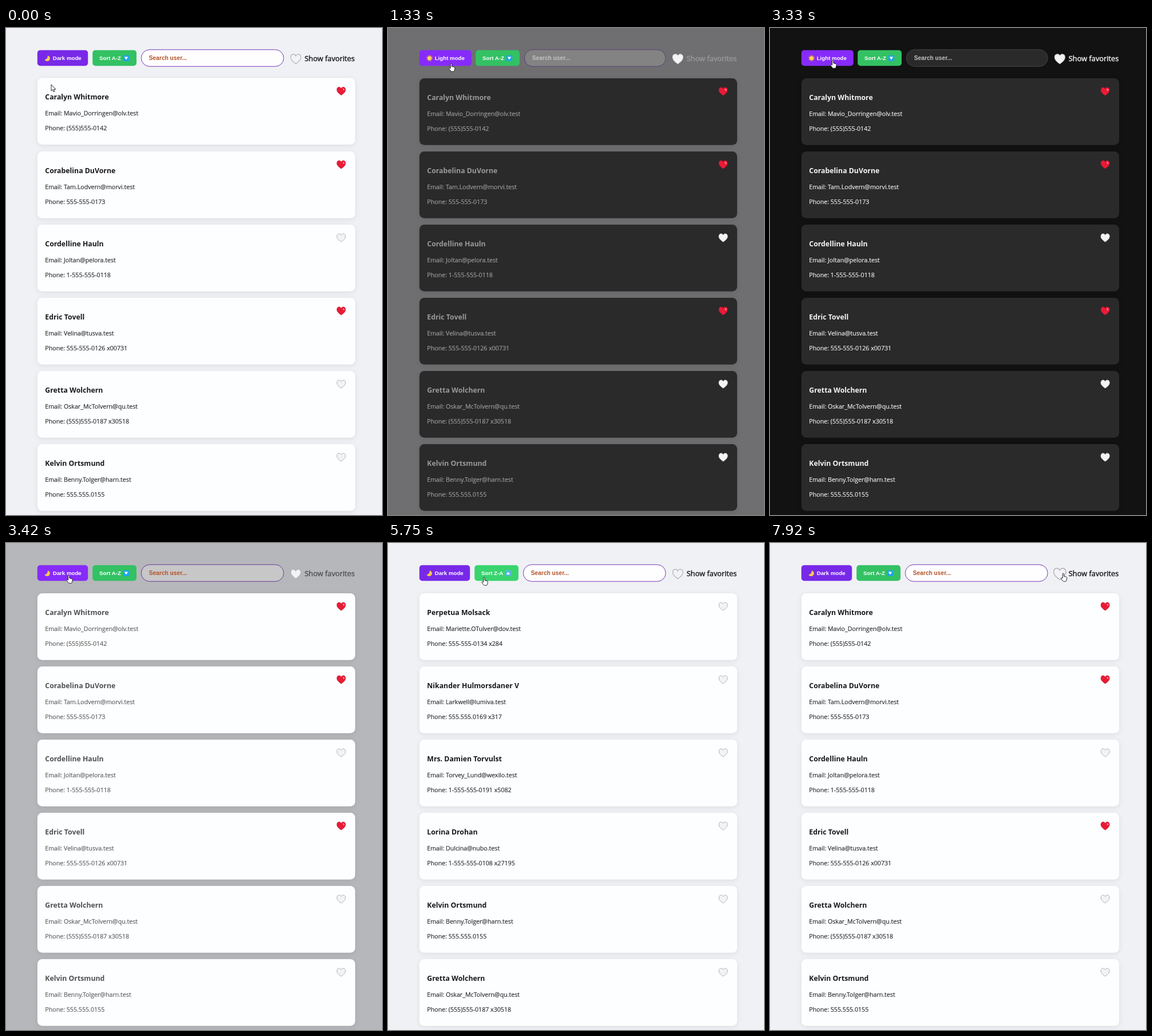
An HTML page for the animation above (8 s loop, 657x852 px).

```html
<!DOCTYPE html>
<html lang="en">
<head>
<meta charset="utf-8">
<title>User list</title>
<style>
  html, body { margin: 0; width: 100%; height: 100%; overflow: hidden; background: #f0f1f5; }
  svg { display: block; width: 657px; height: 852px; background: var(--page); cursor: default; }
  text { font-family: "Open Sans", "Noto Sans", sans-serif; white-space: pre; }
  .card { fill: #fdfeff; filter: drop-shadow(0 2px 4px rgba(0, 0, 0, .08)); }
  .name { font-size: 12.3px; font-weight: 700; fill: var(--title); }
  .line { font-size: 10.65px; fill: var(--body); stroke: var(--body); stroke-width: .18; }
  .label { font-size: 12.8px; fill: var(--title); stroke: var(--title); stroke-width: .4; }
  .button text, #hint { font-family: "Liberation Sans", Arial, sans-serif; font-weight: 700; }
  .button text { font-size: 9.7px; fill: #fff; }
  #hint { font-size: 10.2px; fill: #b4532a; }
  #field { x: 236.3px; width: 248.9px; fill: var(--field); stroke: var(--edge); }
  #modeBox { width: 88.4px; fill: #7829e8; }
  #sortBox { fill: #33c163; }
  #mode.hover #modeBox { fill: #862bfb; }
  #sort.hover #sortBox { fill: #39d46f; }
  .plain { fill: #f3f3f5; stroke: #b0b0b4; stroke-width: 1; }
  .red { fill: #e91b36; stroke: #c51630; stroke-width: .8; }
  .sun { display: none; }
  .dark .sun { display: inline; }
  .dark .moon { display: none; }
  .dark .card { fill: #2a2a2a; }
  .dark .plain { fill: #f4f4f4; stroke: #e2e2e2; }
  .dark #modeBox { width: 91px; }
  .dark #sort { transform: translateX(2px); }
  .dark #field { x: 238.3px; width: 246.9px; }
  .dark #hint { transform: translateX(2px); fill: #c2c2c2; }
  .pointer { fill: #fff; stroke: #111; stroke-width: .9; stroke-linejoin: round; }
</style>
</head>
<body>
<svg id="stage" viewBox="0 0 657 852">
  <defs>
    <path id="heart" d="M0 7C-4 4.4-7.5 1.3-7.5-2.5C-7.5-7.6-1.9-8.4 0-4.5C1.9-8.4 7.5-7.6 7.5-2.5C7.5 1.3 4 4.4 0 7Z"/>
  </defs>

  <g id="mode" class="button">
    <rect id="modeBox" x="54.8" y="38.8" height="27.5" rx="5"/>
    <g class="moon">
      <path d="M72.8 48.2A5 5 0 1 1 67.4 55.3A6.2 6.2 0 0 0 72.8 48.2Z" fill="#f6c94c"/>
      <text x="81.7" y="56">Dark mode</text>
    </g>
    <g class="sun">
      <circle cx="72.5" cy="52.8" r="4.6" fill="none" stroke="#ef9d35" stroke-width="1.5" stroke-dasharray="1.9 1.7"/>
      <circle cx="72.5" cy="52.8" r="3.6" fill="#fbd35c"/>
      <text x="81.7" y="56">Light mode</text>
    </g>
  </g>

  <g id="sort" class="button">
    <rect id="sortBox" x="151.2" y="38.8" width="76.8" height="27.5" rx="5"/>
    <text id="sortText" x="163" y="56"></text>
    <rect id="sortIcon" x="204.8" y="47.7" width="10.4" height="10.4" rx="1.6"/>
    <path id="sortArrow" fill="#fff"/>
  </g>

  <rect id="field" y="37.9" height="29.3" rx="14.6"/>
  <text id="hint" x="249.8" y="56">Search user...</text>
  <use id="showHeart" href="#heart" class="plain"/>
  <text class="label" x="521.8" y="58.2">Show favorites</text>

  <g id="ascending"></g>
  <g id="descending"></g>

  <g id="cursor" class="pointer">
    <path id="arrow" d="M0 0V11.2L2.6 8.8L4.3 12.7L6 12L4.4 8.2H7.8Z"/>
    <path id="hand" d="M-1.2 8.8V1.5a1.15 1.15 0 0 1 2.3 0V5.6L5 6.5Q6.7 7 6.4 8.8L5.6 12.6Q5.3 14.4 3.7 14.4H.8Q-.3 14.4-.9 13.4L-3.9 9.6Q-4.4 8.5-3.5 8.1Q-2.7 7.9-2 8.8Z"/>
    <path id="beam" fill="none" d="M-2 0H2M0 0V13M-2 13H2"/>
  </g>
</svg>

<script>
const LOOP = 8000;
const $ = id => document.getElementById(id);
const stage = $('stage');

const caralyn = ['Caralyn Whitmore', 'Mavio_Dorringen@olv.test', '(555)555-0142', true];
const corabelina = ['Corabelina DuVorne', 'Tam.Lodvern@morvi.test', '555-555-0173', true];
const cordelline = ['Cordelline Hauln', 'Joltan@pelora.test', '1-555-555-0118'];
const edric = ['Edric Tovell', 'Velina@tusva.test', '555-555-0126 x00731', true];
const gretta = ['Gretta Wolchern', 'Oskar_McTolvern@qu.test', '(555)555-0187 x30518'];
const kelvin = ['Kelvin Ortsmund', 'Benny.Tolger@harn.test', '555.555.0155'];
const lorina = ['Lorina Drohan', 'Dulcina@nubo.test', '1-555-555-0108 x27195'];
const damien = ['Mrs. Damien Torvulst', 'Torvey_Lund@wexilo.test', '1-555-555-0191 x5082'];
const nikander = ['Nikander Hulmorsdaner V', 'Larkwell@lumiva.test', '555.555.0169 x317'];
const perpetua = ['Perpetua Molsack', 'Mariette.OTulver@dov.test', '555-555-0134 x284'];

function cardMarkup([name, email, phone, favorite], i) {
  const shine = favorite
    ? '<ellipse cx="590" cy="20" rx="1.1" ry="1.8" fill="#ff9aa5" transform="rotate(-35 590 20)"/>' : '';
  return `<g transform="translate(0 ${88 + 128 * i})"><g class="item">
    <rect class="card" x="54.9" width="555.2" height="116.7" rx="8.5"/>
    <text class="name" x="68.3" y="38">${name}</text>
    <text class="line" x="68.3" y="65.7">Email: ${email}</text>
    <text class="line" x="68.3" y="91.5">Phone: ${phone}</text>
    <use href="#heart" class="${favorite ? 'red' : 'plain'}" x="585.7" y="23"/>${shine}
  </g></g>`;
}
const fillList = (id, people) => { $(id).innerHTML = people.map(cardMarkup).join(''); };
// The last card of each list lies below the stage; only its shadow reaches in.
fillList('ascending', [caralyn, corabelina, cordelline, edric, gretta, kelvin, lorina]);
fillList('descending', [perpetua, nikander, damien, lorina, kelvin, gretta, edric]);
const firstCards = ['ascending', 'descending'].map(id => $(id).querySelector('.item'));

// Pointer tip: time, x, y
const track = [
  [0, 79, 99], [80, 79, 99], [830, 109, 66], [1250, 110.5, 62], [1400, 110.5, 61.5],
  [1750, 110.5, 57.8], [2330, 110, 57], [3000, 110, 57], [3330, 109.8, 56], [3500, 109.8, 56],
  [3960, 109.8, 56], [4180, 197.8, 54.5], [4830, 197.8, 54.5], [5420, 168, 59.7],
  [6000, 168, 59.7], [6420, 176, 58], [6580, 176, 58], [7330, 184, 57],
  [7860, 512.5, 52.8], [8000, 512.5, 52.8]
];
const DARK_AT = 1225, LIGHT_AT = 3345, SORT_Z = 4190, SORT_A = 6830;

const clamp = v => Math.min(1, Math.max(0, v));
const smooth = v => v * v * (3 - 2 * v);
const mix = (a, b, k) => a + (b - a) * k;
const easeOut = v => 1 - (1 - v) ** 2;

// Theme colours: light, dark
const theme = {
  page: [[240, 241, 245], [18, 18, 18]],
  title: [[24, 24, 26], [245, 245, 245]],
  body: [[44, 44, 46], [240, 240, 240]],
  field: [[254, 254, 255], [42, 42, 42]],
  edge: [[116, 55, 184], [70, 70, 70]]
};

function pointerAt(t) {
  const i = Math.max(1, track.findIndex(p => p[0] > t));
  const [t0, x0, y0] = track[i - 1], [t1, x1, y1] = track[i];
  const k = smooth(clamp((t - t0) / (t1 - t0)));
  return [mix(x0, x1, k), mix(y0, y1, k)];
}

function render(t) {
  const dark = t >= DARK_AT && t < LIGHT_AT;
  const reversed = t >= SORT_Z && t < SORT_A;
  const shade = t < LIGHT_AT
    ? easeOut(clamp((t - DARK_AT) / 300))
    : 1 - easeOut(clamp((t - LIGHT_AT) / 155));
  stage.classList.toggle('dark', dark);
  for (const [key, [light, night]] of Object.entries(theme)) {
    const rgb = light.map((v, i) => Math.round(mix(v, night[i], shade)));
    stage.style.setProperty('--' + key, `rgb(${rgb})`);
  }

  $('ascending').style.display = reversed ? 'none' : '';
  $('descending').style.display = reversed ? '' : 'none';
  $('sortText').textContent = reversed ? 'Sort Z-A' : 'Sort A-Z';
  $('sortIcon').setAttribute('fill', reversed ? '#55b9dd' : '#1ea6e4');
  $('sortArrow').setAttribute('d', reversed ? 'M207 55H213L210 50.4Z' : 'M206.8 50.6H213.2L210 55.6Z');

  const [x, y] = pointerAt(t);
  const inside = (left, right, top, bottom) => x >= left && x <= right && y >= top && y <= bottom;
  const shift = dark ? 2 : 0;
  const onMode = inside(55, 143 + shift, 39, 66.5);
  const onSort = inside(151 + shift, 228 + shift, 39, 66.5);
  const onShow = inside(497, 610, 44, 64);
  const onField = inside(236 + shift, 485, 38, 67);
  $('mode').classList.toggle('hover', onMode);
  $('sort').classList.toggle('hover', onSort);
  $('showHeart').setAttribute('transform', `translate(506.4 54.2) scale(${onShow ? 1.42 : 1.18})`);
  const lift = inside(55, 610, 88, 204) ? -.6 : 0;
  firstCards.forEach(card => card.setAttribute('transform', `translate(0 ${lift})`));

  const shape = onMode || onSort || onShow ? 'hand' : onField ? 'beam' : 'arrow';
  for (const id of ['arrow', 'hand', 'beam']) $(id).style.display = id === shape ? '' : 'none';
  $('cursor').setAttribute('transform', `translate(${x} ${y})`);
}

const start = performance.now();
function tick() {
  render((performance.now() - start) % LOOP);
  requestAnimationFrame(tick);
}
tick();
</script>
</body>
</html>
```
